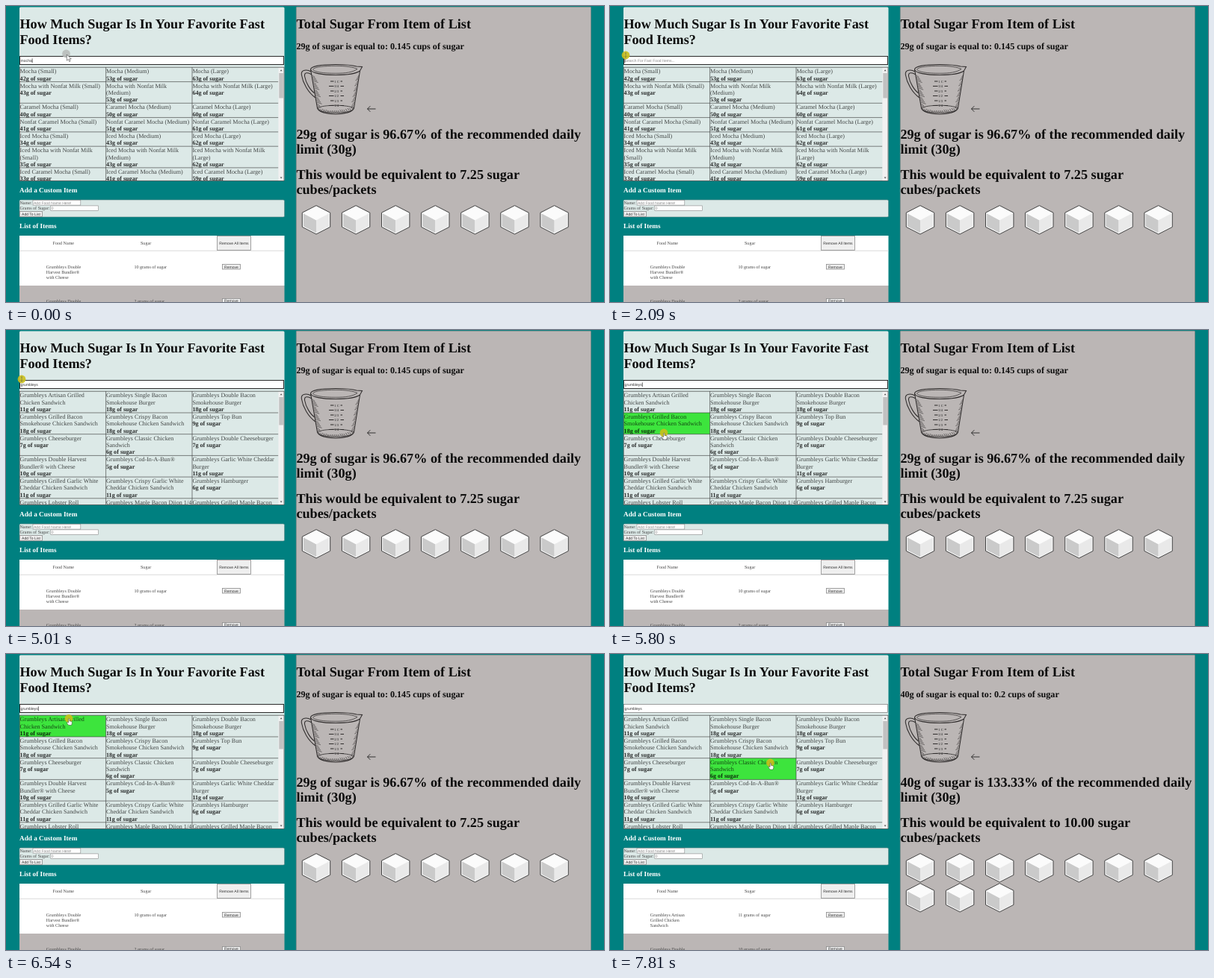
Write an HTML page that moves like this. It is 800x397 px and loops after 8000 ms.

```html
<!DOCTYPE html>
<html lang="en">
<head>
<meta charset="utf-8">
<title>Sugar calculator</title>
<style>
  html, body { margin: 0; width: 100%; height: 100%; overflow: hidden; background: #008080; }
  svg { display: block; width: 100vw; height: 100vh; }
  text { font-family: "Liberation Serif", "Times New Roman", serif; text-rendering: geometricPrecision; white-space: pre; }
  .b { font-weight: bold; }
  .ui { font-family: "Liberation Sans", Arial, sans-serif; }
</style>
</head>
<body>
<svg id="stage" viewBox="0 0 800 397"></svg>
<script>
const LOOP = 8000, STEP = 1000 / 15;
const PALE = '#dce9e7', GREY = '#bbb6b5';
const HEAD = 18.2, ITEM = 8.1, SMALL = 6.07, UI = 5.06;
const LINE = 9.4, TOP = 82.3, COLS = [18.2, 133.6, 249, 364.4];

const text = (x, y, s, size, extra = '') =>
  `<text x="${x}" y="${y}" font-size="${size}" ${extra}>${s}</text>`;
const rect = (x, y, w, h, fill, extra = '') =>
  `<rect x="${x}" y="${y}" width="${w}" height="${h}" fill="${fill}" ${extra}/>`;
const path = (d, extra = '') => `<path d="${d}" ${extra}/>`;
const line = (x1, y1, x2, y2) => path(`M${x1} ${y1}L${x2} ${y2}`);
const button = (x, y, w, h, label) =>
  rect(x, y, w, h, '#efefef', 'stroke="#8c8c8c" stroke-width=".8"') +
  text(x + w / 2, y + h / 2 + 1.8, label, UI, 'class="ui" text-anchor="middle" fill="#333"');

// Items: cells split by ";", lines by "|", grams after ":"
const sizes = (name, grams, breaks = '   ') => ['Small', 'Medium', 'Large']
  .map((s, i) => `${name}${breaks[i]}(${s}):${grams[i]}`).join(';');
const mochaRows = [
  sizes('Mocha', [42, 53, 63]),
  sizes('Mocha with Nonfat Milk', [43, 53, 64], ' | '),
  sizes('Caramel Mocha', [40, 50, 60]),
  sizes('Nonfat Caramel Mocha', [41, 51, 61]),
  sizes('Iced Mocha', [34, 43, 62]),
  sizes('Iced Mocha with Nonfat Milk', [35, 43, 62], '|||'),
  sizes('Iced Caramel Mocha', [33, 41, 59])
];
const BRAND = 'Grumbleys';
const brandRows = [
  'Artisan Grilled|Chicken Sandwich:11;Single Bacon|Smokehouse Burger:18;Double Bacon|Smokehouse Burger:18',
  'Grilled Bacon|Smokehouse Chicken Sandwich:18;Crispy Bacon|Smokehouse Chicken Sandwich:18;Top Bun:9',
  'Cheeseburger:7;Classic Chicken|Sandwich:6;Double Cheeseburger:7',
  'Double Harvest|Bundler® with Cheese:10;Cod-In-A-Bun®:5;Garlic White Cheddar|Burger:11',
  'Grilled Garlic White|Cheddar Chicken Sandwich:11;Crispy Garlic White|Cheddar Chicken Sandwich:11;Hamburger:6',
  'Lobster Roll|Sandwich:8;Maple Bacon Dijon 1/4|lb Burger:12;Grilled Maple Bacon|Dijon Sandwich:13'
].map(r => r.split(';').map(c => BRAND + ' ' + c).join(';'));

function list(rows) {
  let y = TOP, out = '';
  for (const row of rows) {
    const cells = row.split(';').map(c => c.split(':'));
    cells.forEach(([name, grams], col) => {
      const lines = name.split('|'), x = COLS[col] + 0.4;
      lines.forEach((s, i) => out += text(x, y + 7.9 + i * LINE, s, ITEM, 'fill-opacity=".7"'));
      out += text(x, y + 7.9 + lines.length * LINE, grams + 'g of sugar', ITEM, 'class="b" fill-opacity=".82"');
    });
    y += (Math.max(...cells.map(c => c[0].split('|').length)) + 1) * LINE + 0.5;
    out += path(`M18 ${y.toFixed(1)}H364.4`, 'stroke="#333" stroke-width=".6"');
  }
  return out;
}

const tableRow = (y, lines, grams) =>
  lines.map((s, i) => text(53.8, y + i * 7.15, s, SMALL, 'fill="#444"')).join('') +
  text(171.4, y, grams + ' grams of sugar', SMALL, 'fill="#444"') +
  button(289.5, y - 5.1, 24, 6.5, 'Remove');

function cube(i) {
  const x = 415 + (i % 7) * 53.1, y = 286.8 + Math.floor(i / 7) * 40;
  return `<g transform="translate(${x.toFixed(1)} ${y})">` +
    path('M0-19.2L18.7-9.6V9.6L0 19.2L-18.7 9.6V-9.6Z', 'fill="#f6f6f6" stroke="#444" stroke-width="1"') +
    path('M-17-8.6L0 .4V17.4L-17 8.6Z', 'fill="#cacaca"') +
    path('M17-8.6L0 .4V17.4L17 8.6Z', 'fill="#e9e9e9"') +
    path('M0-17.4L17-8.6L0 .4L-17-8.6Z', 'fill="#fbfbfb"') + '</g>';
}

function cup() {
  let s = '';
  // rim with spout, inner lip, body, base
  s += path('M407.5 85C408 80.5 424 78.5 441 78.5C455 78.5 464 79.5 469 81L476.5 81.5L473.5 87C468 91 456 92.5 441 92.5C423 92.5 408 90 407.5 85Z');
  s += path('M410.5 85C413 81.5 426 80.3 441 80.3C455 80.3 465 82 470 84.5C464 88.8 455 90.3 441 90.3C425 90.3 412 88.6 410.5 85Z', 'stroke-width=".7"');
  s += path('M407.5 85L416.5 137C418 142 429 145 441 145C453 145 464 142 465.5 137L473.5 87');
  s += path('M416.5 137C424 132 457 132 465.5 137M419 140C428 144 454 144 463 140', 'stroke-width=".8"');
  // handle
  s += path('M408 88C403 85 394.5 85 395.3 92C397 103 404 116 414 123M409 92C404 89 399 88.5 399.5 94C401 103 407 113 413 117');
  let hatch = '';
  for (let i = 0; i < 18; i++) {
    const y = 93 + i * 2.4, x = 409.3 + i * 0.42;
    hatch += `M${x.toFixed(1)} ${y.toFixed(1)}l${4 + i % 4} 2.4`;
    hatch += `M${(472.4 - i * 0.43).toFixed(1)} ${y.toFixed(1)}l${-2 - i % 3} 2`;
    hatch += `M${418 + i * 2.6} ${137 + Math.round(3 * Math.sin(i / 5))}l2 3`;
  }
  s += path(hatch, 'stroke-width=".6"');
  for (let i = 0; i < 6; i++) {
    const y = 101 + i * 6.5;
    s += line(434 - i % 2 * 2, y, 438.5, y) + line(447.5, y, 450 + i % 2 * 2, y);
    s += text(439.2, y + 1.5, ['1 C', '3/4', '2/3', '1/2', '1/3', '1/4'][i], 4.6, 'fill="#222" stroke="none"');
  }
  return `<g fill="none" stroke="#2f2c2c" stroke-width="1.05">${s}</g>`;
}

const stage = document.getElementById('stage');
stage.innerHTML =
  '<defs><clipPath id="box"><rect x="18" y="82" width="354" height="152.3"/></clipPath></defs>' +
  rect(0, 0, 800, 397, '#008080') +
  rect(18, 1.5, 354.5, 233, PALE, 'rx="1.5"') +
  text(18.4, 30.3, 'How Much Sugar Is In Your Favorite Fast', HEAD, 'class="b" fill="#0c0c0c"') +
  text(18.4, 51, 'Food Items?', HEAD, 'class="b" fill="#0c0c0c"') +
  // search field
  rect(18.5, 67.5, 353, 11, '#fff', 'id="field"') +
  rect(0, 70, 0, 6.6, '#3b8cf0', 'id="mark"') +
  text(19.6, 75, '', UI, 'id="query" class="ui"') +
  rect(0, 70.4, 0.6, 5.8, '#000', 'id="caret"') +
  // results
  '<g clip-path="url(#box)">' + rect(18, 82, 354, 153, PALE) + rect(0, 0, 115.4, 28.7, '#3de43d', 'id="hover"') +
  `<g id="mocha">${list(mochaRows)}</g><g id="brand">${list(brandRows)}</g>` +
  path('M133.6 82V235M249 82V235', 'stroke="#333" stroke-width=".6"') +
  rect(364.4, 82, 7.6, 153, '#f1f1f1') + rect(365.3, 90, 5.6, 33.5, '#c1c1c1', 'id="thumb"') +
  path('M366.6 87.2h3l-1.5-2zM366.6 229.5h3l-1.5 2z', 'fill="#555"') + '</g>' +
  rect(18.2, 82.2, 353.8, 152.2, 'none', 'stroke="#444" stroke-width=".7"') +
  // custom item form
  text(18, 249.7, 'Add a Custom Item', 9.2, 'class="b" fill="#fff"') +
  rect(18, 260, 354.5, 23, PALE, 'rx="1.5" stroke="#5a8583" stroke-width=".6"') +
  text(18.4, 265.7, 'Name:', SMALL, 'fill="#444"') +
  text(18.4, 273, 'Grams of Sugar:', SMALL, 'fill="#444"') +
  rect(36, 260.6, 63.8, 6.5, '#fff', 'stroke="#888" stroke-width=".6"') +
  rect(59.8, 267.9, 63.8, 6.5, '#fff', 'stroke="#888" stroke-width=".6"') +
  text(37, 265.6, 'Add Food Name Here!', UI, 'class="ui" fill="#888"') +
  text(60.8, 272.9, '0', UI, 'class="ui" fill="#888"') +
  button(18.5, 275.5, 30, 7, 'Add To List') +
  // chosen items
  text(18, 298.3, 'List of Items', 9.2, 'class="b" fill="#fff"') +
  rect(18, 308, 354.5, 67, '#fff') + rect(18, 375, 354.5, 22, GREY) +
  path('M18 328.3H372.5', 'stroke="#ccc" stroke-width=".7"') +
  text(62.6, 319.8, 'Food Name', SMALL, 'fill="#444"') + text(180, 319.8, 'Sugar', SMALL, 'fill="#444"') +
  button(282.5, 308.5, 45, 19, 'Remove All Items') +
  '<g id="before">' + tableRow(351.6, [BRAND + ' Double', 'Harvest Bundler®', 'with Cheese'], 10) +
  tableRow(397.5, [BRAND + ' Double'], 2) + '</g>' +
  '<g id="after">' + tableRow(351.6, [BRAND + ' Artisan', 'Grilled Chicken', 'Sandwich'], 11) +
  tableRow(397.5, [BRAND + ' Double'], 10) + '</g>' +
  // totals
  rect(388.3, 1.3, 394.2, 400, GREY, 'stroke="#858180" stroke-width=".6" rx="1"') +
  '<g class="b" fill="#0c0c0c">' +
  text(388.4, 30.3, 'Total Sugar From Item of List', HEAD) +
  text(388.4, 58.2, '', 12.12, 'id="cups"') +
  text(388.4, 177.8, '', HEAD, 'id="limit"') + text(388.4, 198.2, 'limit (30g)', HEAD) +
  text(388.4, 231.5, '', HEAD, 'id="packs"') + text(388.4, 251.8, 'cubes/packets', HEAD) + '</g>' +
  cup() +
  path('M494.5 138H483.5M487.3 134.2L483.5 138L487.3 141.8', 'fill="none" stroke="#222" stroke-width=".9"') +
  [0, 1, 2, 3, 4, 5, 6].map(cube).join('') + `<g id="extra">${[7, 8, 9].map(cube).join('')}</g>` +
  // pointer
  '<g id="pointer"><circle r="5.4" fill-opacity=".9" id="halo"/>' +
  path('M.8 1V9.2L2.8 7.5L4.2 10.6L5.6 10L4.2 7H6.8Z', 'id="arrow" fill="#fff" stroke="#444" stroke-width=".6"') +
  path('M-1-3H1M0-3V3M-1 3H1', 'id="beam" fill="none" stroke="#555" stroke-width=".5"') +
  path('M-.4 .6Q.4-.3 1 .6V3.4Q4.2 3.2 4.4 5.2Q4.4 7.4 3.4 9H-.2Q-2.4 6.8-2.6 5.2Q-1.4 4.4-.4 5.6Z',
    'id="hand" fill="#fff" stroke="#333" stroke-width=".5"') + '</g>';

const el = id => document.getElementById(id);
const show = (id, on) => el(id).setAttribute('display', on ? 'inline' : 'none');
const set = (id, attrs) => { for (const k in attrs) el(id).setAttribute(k, attrs[k]); };

// Pointer stops: time, x, y
const route = [
  [0, 80.5, 64], [400, 80.5, 64], [600, 40, 68], [730, 40, 68], [1000, 37, 69], [1133, 33, 69], [1333, 21, 66],
  [5400, 21, 66], [5600, 34, 84], [5800, 72, 138], [5930, 97, 180], [6067, 101, 173], [6133, 100, 156.5],
  [6267, 91, 117], [6400, 85, 94], [6533, 84, 86.5], [6700, 84, 87.5], [7200, 84, 87.5],
  [7400, 116, 102], [7600, 178, 130], [7800, 214.5, 146]
];
function pointerAt(t) {
  const i = route.findIndex(k => k[0] > t);
  if (i < 0) return route[route.length - 1].slice(1);
  if (i === 0) return route[0].slice(1);
  const [t0, x0, y0] = route[i - 1], [t1, x1, y1] = route[i];
  const k = (t - t0) / (t1 - t0);
  return [x0 + (x1 - x0) * k, y0 + (y1 - y0) * k];
}

const keyTimes = [2880, 3080, 3340, 3540, 3670, 3800, 3930, 4130, 4400];
function typed(t) {
  if (t < 1820) return 'mocha';
  if (t < 2090) return 'm';
  return BRAND.toLowerCase().slice(0, keyTimes.filter(k => k <= t).length);
}
const caretOff = [[530, 1000], [1130, 1820], [2350, 2880], [4920, 5470], [6000, 6530]];
const CLICK = 6670, ADDED = 6810;

function draw(t) {
  const tick = Math.floor((t + 5) / STEP) * STEP;
  const [x, y] = pointerAt(tick);
  const done = t >= ADDED, found = t >= 4920;

  const query = typed(t);
  el('query').textContent = query || 'Search For Fast Food Items...';
  set('query', { fill: query ? '#333' : '#888' });
  const end = 19.6 + (query ? el('query').getComputedTextLength() : 0);
  set('caret', { x: end });
  show('caret', !done && !caretOff.some(([a, b]) => t >= a && t < b));
  const from = Math.max(23.8, x);
  const marked = t >= 1060 && t < 1820;
  show('mark', marked);
  if (marked) set('mark', { x: from, width: Math.max(0, end - from), 'fill-opacity': .55 });
  set('field', { stroke: done ? '#777' : '#2a2a2a', 'stroke-width': done ? .7 : 1 });

  show('mocha', !found);
  show('brand', found);
  set('thumb', { height: found ? 37.5 : 33.5 });
  show('before', !done);
  show('after', done);
  show('extra', done);
  const [grams, cups, pct, packs] = done ? [40, '0.2', '133.33', '10.00'] : [29, '0.145', '96.67', '7.25'];
  el('cups').textContent = `${grams}g of sugar is equal to: ${cups} cups of sugar`;
  el('limit').textContent = `${grams}g of sugar is ${pct}% of the recommended daily`;
  el('packs').textContent = `This would be equivalent to ${packs} sugar`;

  // the highlight trails the pointer by one tick
  const [hx, hy] = pointerAt(tick - STEP);
  const over = found && hy > TOP;
  show('hover', over);
  if (over) set('hover', { x: COLS[hx < COLS[1] ? 0 : 1], y: TOP + Math.floor((hy - TOP) / 28.7) * 28.7 });

  const pressed = (t >= 1000 && t < 1340) || (t >= CLICK && t < ADDED);
  const warm = Math.min(1, Math.max(0, tick / 250));
  const mix = (a, b) => Math.round(a + (b - a) * warm);
  set('halo', { fill: pressed ? '#f8f61c' : `rgb(${mix(184, 202)},${mix(188, 191)},${mix(186, 28)})` });
  set('pointer', { transform: `translate(${x.toFixed(2)} ${y.toFixed(2)})` });
  show('arrow', y < 65);
  show('beam', y >= 65 && y < 80);
  show('hand', y >= 80);
}

const start = performance.now();
function frame() {
  draw((performance.now() - start) % LOOP);
  requestAnimationFrame(frame);
}
draw(0);
requestAnimationFrame(frame);
</script>
</body>
</html>
```
